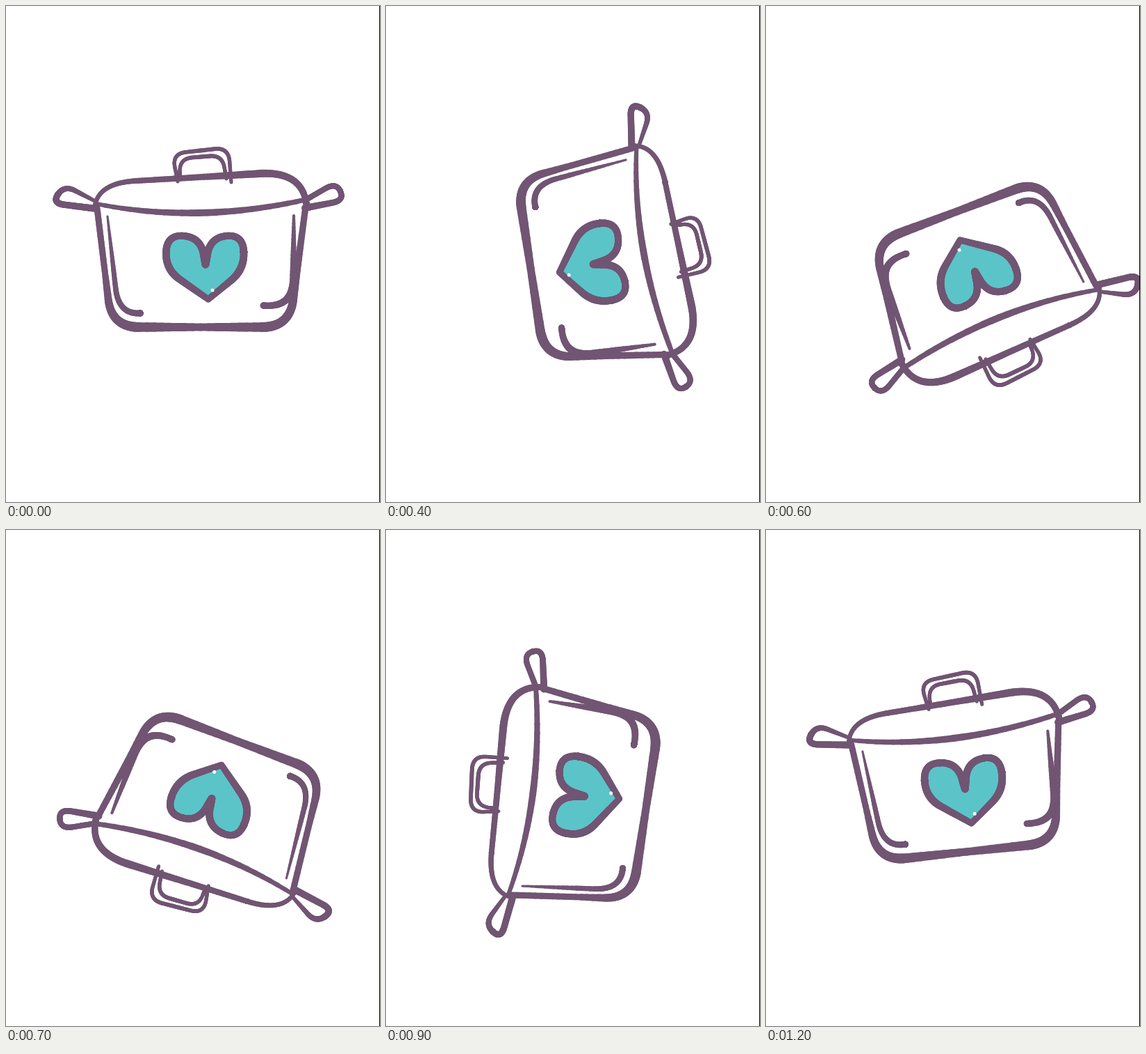
Animation, 538 px wide and 712 px high, one loop 1300 ms. Source, as an HTML page with a canvas:

```html
<!DOCTYPE html>
<html lang="en">
<head>
<meta charset="utf-8">
<title>Tumbling pot</title>
<style>
html, body { margin: 0; width: 100%; height: 100%; overflow: hidden; background: #fff; }
canvas { display: block; }
</style>
</head>
<body>
<canvas id="stage" width="538" height="712"></canvas>
<script>
const ctx = document.getElementById('stage').getContext('2d');
const W = 538, H = 712;
const INK = '#715573', TEAL = '#5bc4c8';
const LOOP = 1300, STEP = 100;
const PIVOT = { x: 292.8, y: 377.4 };

const mix = (a, b, t) => a + (b - a) * t;
const between = (p, q, t) => [mix(p[0], q[0], t), mix(p[1], q[1], t)];
const dist = (p, q) => Math.hypot(q[0] - p[0], q[1] - p[1]);

// Polyline whose inner corners are rounded over at most r on each side.
function bend(r, ...pts) {
  const last = pts.length - 1, out = [pts[0]];
  const add = (curve, n) => {
    for (let k = 1; k <= n; k++) out.push(curve(k / n));
  };
  const cut = (corner, end) => {
    const len = dist(pts[corner], pts[end]);
    const free = end === 0 || end === last ? len : len / 2;
    return between(pts[corner], pts[end], Math.min(r, free) / len);
  };
  for (let i = 1; i < last; i++) {
    const from = out[out.length - 1], a = cut(i, i - 1), b = cut(i, i + 1);
    add(t => between(from, a, t), 16);
    add(t => between(between(a, pts[i], t), between(pts[i], b, t), t), 24);
  }
  const from = out[out.length - 1];
  add(t => between(from, pts[last], t), 16);
  return out;
}

// Ink a line; the widths are spread evenly along its length.
function ink(line, ...widths) {
  const spans = line.slice(1).map((p, i) => dist(line[i], p));
  const total = spans.reduce((a, b) => a + b);
  let done = 0;
  spans.forEach((span, i) => {
    const u = (done + span / 2) / total * (widths.length - 1);
    const k = Math.min(Math.floor(u), widths.length - 2);
    ctx.lineWidth = mix(widths[k], widths[k + 1], u - k);
    ctx.beginPath();
    ctx.moveTo(...line[i]);
    ctx.lineTo(...line[i + 1]);
    ctx.stroke();
    done += span;
  });
}

// One lobe of the heart, from the dip to the tip.
function lobe(side) {
  const at = (dx, y) => [287 + side * dx, y];
  return bend(25, at(0, 371), at(7, 332), at(54, 328), at(56, 378), [291, 421]);
}

function drawHeart() {
  const left = lobe(-1.03), right = lobe(1);
  ctx.fillStyle = TEAL;
  ctx.beginPath();
  [...left, ...[...right].reverse()].forEach(p => ctx.lineTo(...p));
  ctx.fill();
  ink(left, 11, 10, 11, 9);
  ink(right, 11, 10, 11, 9);
  ctx.fillStyle = '#fff';
  ctx.beginPath();
  ctx.arc(297, 408, 2.5, 0, 2 * Math.PI);
  ctx.fill();
}

function drawBody() {
  ink(bend(40, [131, 290], [152, 461], [408, 461], [431, 288]), 9, 9, 14, 11, 14, 10, 9);
  ink(bend(38, [146, 302], [162, 443], [193, 441]), 3, 7, 9);
  ink(bend(40, [414, 301], [413, 432], [370, 430]), 4, 8, 11, 9);
}

function drawLid() {
  ink(bend(60, [128, 286], [134, 254], [240, 248], [425, 237], [432, 283]), 6, 8, 9, 11, 9);
  ink(bend(200, [130, 284], [275, 313], [431, 278]), 6, 10, 7);
  ink(bend(20, [247, 252], [239, 212], [320, 203], [324, 253]), 5, 6, 5);
  ink(bend(18, [250, 243], [250, 219], [311, 214], [317, 248]), 5, 6, 5);
}

function drawHandles() {
  ink(bend(18, [130, 281], [84, 257], [66, 283], [130, 291]), 5, 9, 10);
  ink(bend(18, [430, 279], [475, 253], [487, 279], [430, 290]), 8, 8, 10);
}

function render(time) {
  const x = Math.floor(time % LOOP / STEP) * STEP / LOOP;
  ctx.fillStyle = '#fff';
  ctx.fillRect(0, 0, W, H);
  ctx.save();
  ctx.translate(PIVOT.x, PIVOT.y);
  ctx.rotate(2 * Math.PI * x * x * (3 - 2 * x));
  ctx.translate(-PIVOT.x, -PIVOT.y);
  ctx.strokeStyle = INK;
  ctx.lineCap = 'round';
  drawHeart();
  drawBody();
  drawLid();
  drawHandles();
  ctx.restore();
  ctx.fillStyle = '#000';
  ctx.fillRect(W - 1, 0, 1, H);
}

const start = performance.now();
function tick() {
  render(performance.now() - start);
  requestAnimationFrame(tick);
}
tick();
</script>
</body>
</html>
```
